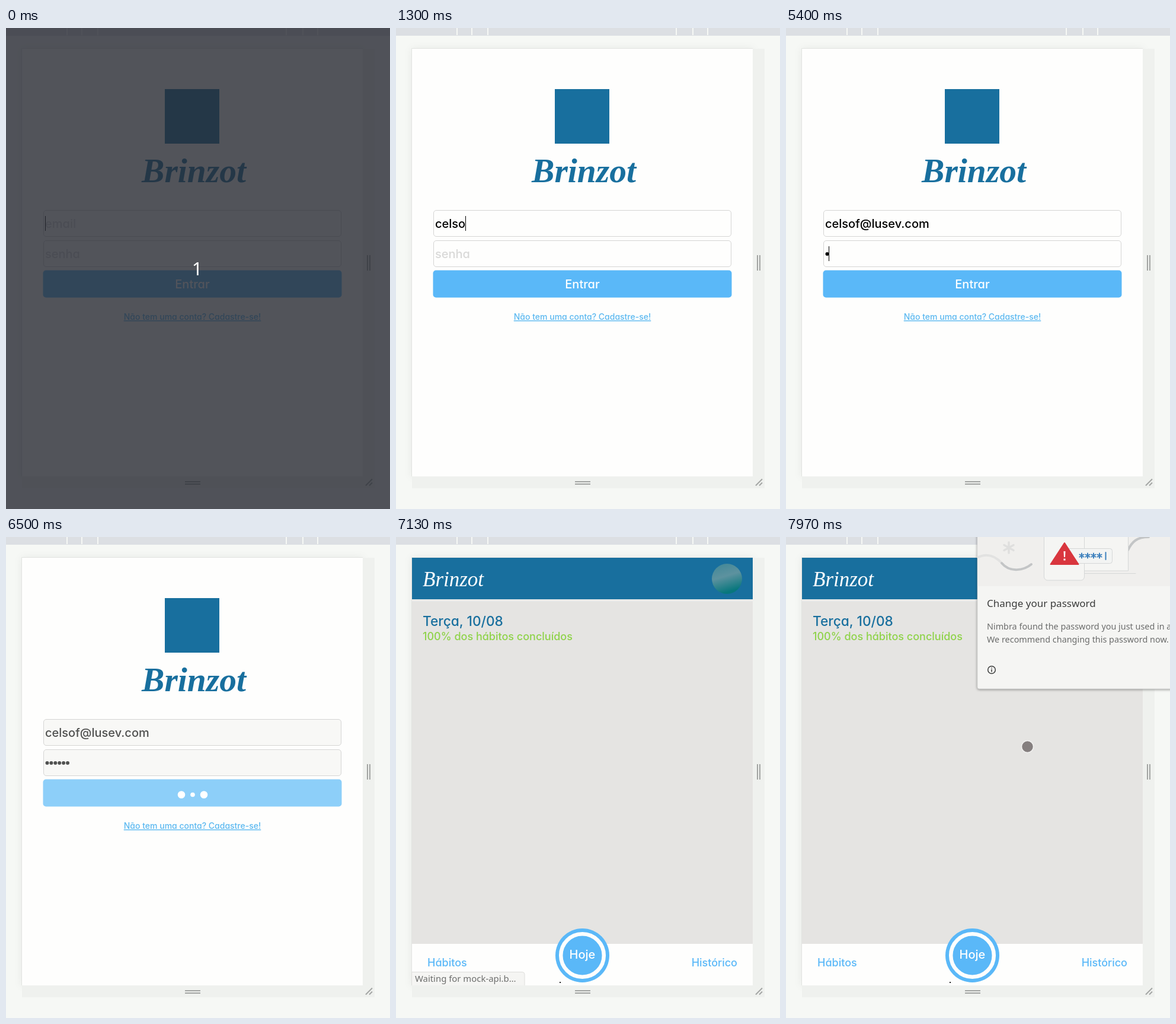
An HTML page that plays this animation: 648x811 px, repeating every 8000 ms.

```html
<!DOCTYPE html>
<html lang="pt">
<head>
<meta charset="utf-8">
<title>Login</title>
<style>
html, body { margin: 0; width: 100%; height: 100%; overflow: hidden; background: #f6f8f5; }
svg { display: block; width: 648px; height: 811px; }
text { font-family: Inter, sans-serif; font-size: 20px; font-weight: 450; font-feature-settings: "cv11"; white-space: pre; }
.sys { font-family: "Noto Sans", "Open Sans", sans-serif; font-weight: 400; }
.brand { font-family: "Liberation Serif", serif; font-style: italic; font-weight: 400; }
.mid { text-anchor: middle; }
.small { font-size: 18px; }
.box { stroke: #d5d5d4; }
</style>
</head>
<body>
<svg viewBox="0 0 648 811" xmlns="http://www.w3.org/2000/svg">
  <defs>
    <linearGradient id="sea" x1="0" y1="0" x2=".3" y2="1">
      <stop offset="0" stop-color="#3f8797"/><stop offset=".5" stop-color="#5d929f"/><stop offset="1" stop-color="#08777d"/>
    </linearGradient>
    <filter id="glow" x="-10%" y="-10%" width="120%" height="120%">
      <feDropShadow dx="0" dy="0" stdDeviation="7" flood-color="#000" flood-opacity=".07"/>
    </filter>
    <filter id="soft" x="-10%" y="-10%" width="120%" height="120%">
      <feDropShadow dx="0" dy="1" stdDeviation="2" flood-color="#000" flood-opacity=".45"/>
    </filter>
    <clipPath id="view"><rect x="27" y="35" width="575" height="721"/></clipPath>
  </defs>

  <!-- browser frame -->
  <rect width="648" height="811" fill="#f6f8f5"/>
  <rect x="27" y="35" width="575" height="721" fill="#fefefd" filter="url(#glow)"/>
  <rect width="648" height="13" fill="#dcdfe3"/>
  <path d="M103 0v12M128 0v12M155 0v12M473 0v12M501 0v12M526 0v12" stroke="#f6f8f5" stroke-width="2"/>
  <path d="M602 35h20v741H27v-20h575z" fill="#eff1ee"/>
  <path d="M26.5 756V34.500H602" fill="none" stroke="#e2e4e1"/>
  <path d="M610 383v26M614 383v26M302 765h26M302 769h26M607 771.500l11-11M613 771.500l5-5" stroke="#a3a5a3" stroke-width="2" fill="none"/>

  <g id="login">
    <rect x="268" y="103" width="92" height="92" fill="#186f9e"/>
    <text class="brand mid" x="317" y="260" fill="#186f9e" style="font-size:57.5px;font-weight:700">Brinzot</text>
    <rect id="mailBox" class="box" x="63.5" y="307.5" width="502" height="44" rx="4.5"/>
    <rect id="passBox" class="box" x="63.5" y="358.5" width="502" height="44" rx="4.5"/>
    <text id="mail" x="66" y="337"></text>
    <text id="passHint" x="66" y="388" fill="#d9d9d8">senha</text>
    <g id="bullets"></g>
    <rect id="caret" width="1" height="25"/>
    <rect id="button" x="62.5" y="408.5" width="504" height="46" rx="5"/>
    <text id="enter" class="mid" x="314.5" y="439" fill="#fff">Entrar</text>
    <g id="dots" fill="#fff">
      <circle cx="296" cy="434.500"/><circle cx="315" cy="434.500"/><circle cx="334" cy="434.500"/>
    </g>
    <text class="mid" x="314.5" y="492" fill="#5ab8f0" text-decoration="underline" style="font-size:14px">Não tem uma conta? Cadastre-se!</text>
  </g>

  <g id="today" clip-path="url(#view)">
    <rect x="27" y="35" width="575" height="721" fill="#e5e4e2"/>
    <rect x="27" y="105" width="575" height="4" fill="#e9eae9"/>
    <rect x="27" y="35" width="575" height="70" fill="#186f9e"/>
    <text class="brand" x="45" y="83" fill="#fff" style="font-size:35px">Brinzot</text>
    <circle cx="558.5" cy="70.5" r="25.5" fill="url(#sea)"/>
    <text x="45" y="150" fill="#186f9e" style="font-size:22.7px">Terça, 10/08</text>
    <text class="small" x="45" y="174" fill="#8fd34a">100% dos hábitos concluídos</text>
    <rect x="27" y="686" width="575" height="70" fill="#fefefd"/>
    <text class="small" x="53" y="724" fill="#5ab8f8">Hábitos</text>
    <text class="small" x="576" y="724" fill="#5ab8f8" text-anchor="end">Histórico</text>
    <circle cx="314.5" cy="705.5" r="45.5" fill="#5ab8f8"/>
    <circle cx="314.5" cy="705.5" r="36.3" fill="none" stroke="#fefefd" stroke-width="6.5"/>
    <text class="mid" x="314.5" y="711" fill="#fff">Hoje</text>
    <rect x="276" y="750" width="2" height="2" fill="#222"/>
  </g>

  <g id="status">
    <path d="M26.5 756V733.5H213q4 0 4 4V756" fill="#f5f5f3" stroke="#dededc"/>
    <text class="sys" x="32" y="750" fill="#6c6d6c" style="font-size:14.9px">Waiting for mock-api.b…</text>
  </g>

  <g id="popup">
    <path d="M323-10H670V256H326q-3 0-3-3z" fill="#f5f5f3" stroke="#c4c5c3" stroke-width=".6" filter="url(#soft)"/>
    <path d="M323.5 0H648V83H323.5z" fill="#f0efed"/>
    <g fill="none" stroke-linecap="round">
      <path d="M324 34Q346 24 364 44" stroke="#e2e2e1" stroke-width="4"/>
      <path d="M364 44C378 61 402 56 414 46" stroke="#c3c5c6" stroke-width="4"/>
      <path d="M376 9v18M368 13.500l16 9M368 22.500l16-9" stroke="#dfdfde" stroke-width="3.500"/>
      <path d="M577 22C584 8 592 0 612 0" stroke="#c3c5c6" stroke-width="4"/>
      <path d="M500-5H577.500V57H500" fill="#f5f5f3" stroke="#d5d7d7"/>
      <path d="M503 61.500H590" stroke="#d5d7d7"/>
      <rect x="435.500" y="-10" width="68" height="83" rx="6" fill="#f5f5f3" stroke="#d5d7d7"/>
      <rect x="470.500" y="19.500" width="80" height="25" rx="4" fill="#f3f4f3" stroke="#d5d7d7"/>
      <path id="stars" stroke="#3d80bd" stroke-width="2"/>
      <path d="M539.500 26v12" stroke="#3d80bd" stroke-width="2"/>
    </g>
    <path d="M470 10L446.500 46H493.500z" fill="#d9363e" stroke="#d9363e" stroke-width="2" stroke-linejoin="round"/>
    <path d="M468.500 24h3l-.5 10h-2zM468.500 36.500h3v3h-3z" fill="#fff"/>
    <text class="sys" x="339" y="118" fill="#3b3c3b" style="font-size:17px">Change your password</text>
    <g fill="#6b6c6b">
      <text class="sys" x="339" y="156" style="font-size:14.4px">Nimbra found the password you just used in a data</text>
      <text class="sys" x="339" y="178" style="font-size:14.4px">We recommend changing this password now.</text>
    </g>
    <circle cx="347" cy="224" r="6.300" fill="none" stroke="#3b3c3b" stroke-width="1.500"/>
    <path d="M347 223v4.500M347 220.300v1.500" stroke="#3b3c3b" stroke-width="1.500"/>
  </g>

  <circle id="touch" r="10" fill="#857f7f" stroke="#f1f1f0" stroke-width="1.500"/>

  <g id="countdown">
    <rect width="648" height="811" fill="rgb(39,42,51)" fill-opacity=".8"/>
    <text class="sys mid" x="322.500" y="417" fill="#fff" style="font-size:31px">1</text>
  </g>
</svg>
<script>
const LOOP = 8000, SEND = 6500, OPEN = 7130, POP = 7330;
const EMAIL = "celsof@lusev.com";
const MAIL_KEYS = [600, 1030, 1120, 1210, 1300, 2030, 2570, 2870, 3100, 3270, 3350, 3430, 4070, 4190, 4310, 4430];
const PASS_KEYS = [5400, 5570, 5670, 6000, 6085, 6170];
const MOVES = [7670, 7770, 7870, 7970];

const $ = id => document.getElementById(id);
const show = (id, on) => $(id).style.display = on ? "" : "none";
const set = (id, attrs) => { for (const k in attrs) $(id).setAttribute(k, attrs[k]); };
const count = (times, t) => times.filter(x => t >= x).length;
const ramp = (t, from, to) => Math.min(1, Math.max(0, (t - from) / (to - from)));

$("bullets").innerHTML = PASS_KEYS.map((_, i) => `<circle cx="${69.5 + i * 6.9}" cy="381" r="3"/>`).join("");
set("stars", { d: [499, 509, 519, 529].map(x => `M${x} 27.500v8M${x - 3.5} 29.500l7 4M${x - 3.5} 33.500l7-4`).join("") });

function drawLogin(t) {
  const typed = count(MAIL_KEYS, t), secret = count(PASS_KEYS, t);
  const busy = t >= SEND, onPass = t >= 4600;
  const ink = busy ? "#505150" : "#000";
  $("mail").textContent = typed ? EMAIL.slice(0, typed) : "email";
  set("mail", { fill: typed ? ink : "#d9d9d8" });
  set("bullets", { fill: ink });
  [...$("bullets").children].forEach((b, i) => b.style.display = i < secret ? "" : "none");
  show("passHint", !secret);

  const width = onPass ? secret * 6.9 : typed ? $("mail").getComputedTextLength() : 0;
  set("caret", { x: Math.floor(66 + width), y: onPass ? 368 : 317 });
  show("caret", !busy);

  const fill = busy ? "#f8f8f6" : "#fefefd";
  set("mailBox", { fill });
  set("passBox", { fill });
  set("button", { fill: busy ? "#8dcff9" : "#5ab8f8" });
  show("enter", !busy);
  show("dots", busy);
  // outer dots shrink while the middle one grows
  const wave = Math.abs(1 - 2 * (Math.max(0, t - SEND) % 800) / 800);
  [...$("dots").children].forEach((d, i) => d.setAttribute("r", 3.8 + 2.5 * (i === 1 ? 1 - wave : wave)));
}

function draw(t) {
  const open = t >= OPEN;
  show("login", !open);
  show("today", open);
  if (!open) drawLogin(t);

  set("status", { opacity: ramp(t, 6600, 6720) * (1 - ramp(t, POP, 7500)) });
  show("popup", t >= POP);
  set("popup", { opacity: ramp(t, POP - 40, 7530) });

  const p = count(MOVES, t) / MOVES.length;
  show("touch", t >= 7530);
  set("touch", { cx: 97 + 310.5 * p, cy: 657 - 303.5 * p });
  show("countdown", t < 30);
}

const start = performance.now();
function tick() {
  draw((performance.now() - start) % LOOP);
  requestAnimationFrame(tick);
}
tick();
</script>
</body>
</html>
```
